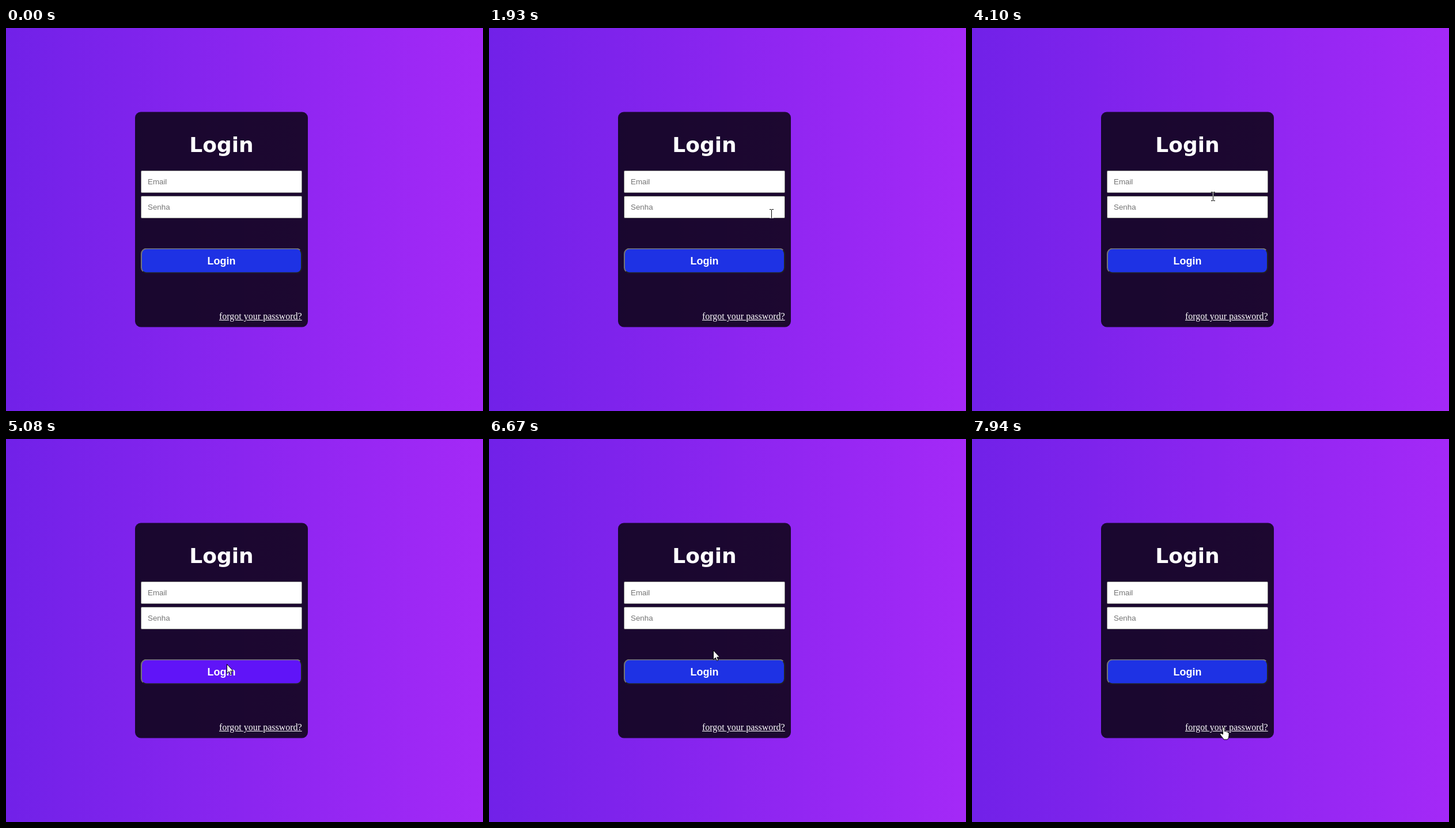
Recreate the animation shown at these times as an HTML page. Size 828 by 664 pixels, loop 8000 ms.

```html
<!DOCTYPE html>
<html lang="en">
<head>
<meta charset="utf-8">
<title>Login</title>
<style>
  html, body { margin: 0; width: 100%; height: 100%; overflow: hidden; }
  body { position: relative; background: linear-gradient(to right, #7121e8, #a429f7); cursor: none; }
  body > * { position: absolute; box-sizing: border-box; white-space: nowrap; }
  .card, #btn { transform: translateY(.5px); }
  .card { left: 224px; top: 145px; width: 300px; height: 373px; border-radius: 10px; background: rgba(0, 0, 0, .8); }
  h1 { left: 224px; top: 182px; width: 300px; margin: 0; text-align: center; color: #fff;
       font: bold 36px "DejaVu Sans", Verdana, sans-serif; }
  .field { left: 234px; width: 280px; height: 39px; padding: 11px; border: 1px solid #767676; border-radius: 2px;
           background: #fff; color: #757575; font: 13.333px/15px "Liberation Sans", Arial, sans-serif; }
  .field.hover { border-color: #4f4f4f; }
  #email { top: 247px; }
  #pass { top: 291px; }
  #btn { left: 234px; top: 381px; width: 280px; height: 44px; padding: 10px 0; border: 2px outset #767676; border-radius: 10px;
         background: #1e32e4; color: #fff; text-align: center; font: bold 18px/20px "Liberation Sans", Arial, sans-serif; }
  #btn.hover { background: #6014f8; }
  #link { left: 370px; top: 491px; color: #fff; text-decoration: underline;
          font: 16px/18px "Liberation Serif", "Times New Roman", serif; }
  #pointer { left: 0; top: 0; width: 1px; height: 1px; overflow: visible; }
  #pointer.text { mix-blend-mode: difference; }
  #pointer path { display: none; fill: #fff; stroke: #000; stroke-linejoin: round; }
  #pointer.arrow .arrow, #pointer.text .text, #pointer.hand .hand { display: inline; }
  #pointer .text { fill: none; stroke: #fff; shape-rendering: crispEdges; }
</style>
</head>
<body>
<div class="card"></div>
<h1>Login</h1>
<div class="field" id="email" data-look="text">Email</div>
<div class="field" id="pass" data-look="text">Senha</div>
<div id="btn" data-look="arrow">Login</div>
<div id="link" data-look="hand">forgot your password?</div>
<svg id="pointer">
  <path class="arrow" d="M.5 .5V16.5L4.2 13L6.6 18.5L9 17.5L6.7 12.2H11.5Z"/>
  <path class="text" d="M-3 -7.5h3m1 0h3M.5 -7v14M-3 7.5h3m1 0h3"/>
  <path class="hand" transform="translate(-7 -1)"
    d="M5.5 13V2q0-1.5 1.5-1.5T8.5 2V8q1.7-1 3 .6q1.6-.6 2.6.8q2-.2 2 1.8V15q0 4-2.5 7H7q-1-2.5-4-5.5L.8 13.2q-.6-1.6.8-1.8t3.9 1.6Z"/>
</svg>
<script>
  const LOOP = 8000;
  const ENTER = { time: 1390, x: 750, y: 661 };
  // the pointer rests between moves
  const moves = [
    { from: 1390, to: 2140, x: 468, y: 294 },
    { from: 2210, to: 2580, x: 455, y: 257 },
    { from: 2800, to: 3300, x: 434, y: 266 },
    { from: 3960, to: 4480, x: 400, y: 322 },
    { from: 4780, to: 5340, x: 379, y: 408 },
    { from: 6000, to: 6460, x: 389, y: 365 },
    { from: 6670, to: 6860, x: 405, y: 426 },
    { from: 7000, to: 7060, x: 408, y: 426 },
    { from: 7270, to: 7940, x: 437, y: 500 }
  ];

  const svg = document.getElementById('pointer');
  const targets = [...document.querySelectorAll('[data-look]')];
  const clamp = v => Math.min(1, Math.max(0, v));
  const easeOut = p => 1 - (1 - p) * (1 - p);

  function pointerAt(t) {
    let { x, y } = ENTER;
    for (const m of moves) {
      const p = easeOut(clamp((t - m.from) / (m.to - m.from)));
      x += (m.x - x) * p;
      y += (m.y - y) * p;
    }
    return { x: Math.round(x), y: Math.round(y) };
  }

  function isOver(el, { x, y }) {
    const b = el.getBoundingClientRect();
    return x >= b.left && x < b.right && y >= b.top && y <= b.bottom + 1;
  }

  function draw(t) {
    const shown = t >= ENTER.time;
    const pos = pointerAt(t);
    let look = shown ? 'arrow' : '';
    for (const el of targets) {
      const over = shown && isOver(el, pos);
      el.classList.toggle('hover', over);
      if (over) look = el.dataset.look;
    }
    svg.setAttribute('class', look);
    svg.style.transform = `translate(${pos.x}px, ${pos.y}px)`;
  }

  const start = performance.now();
  function tick() {
    draw((performance.now() - start) % LOOP);
    requestAnimationFrame(tick);
  }
  tick();
</script>
</body>
</html>
```
